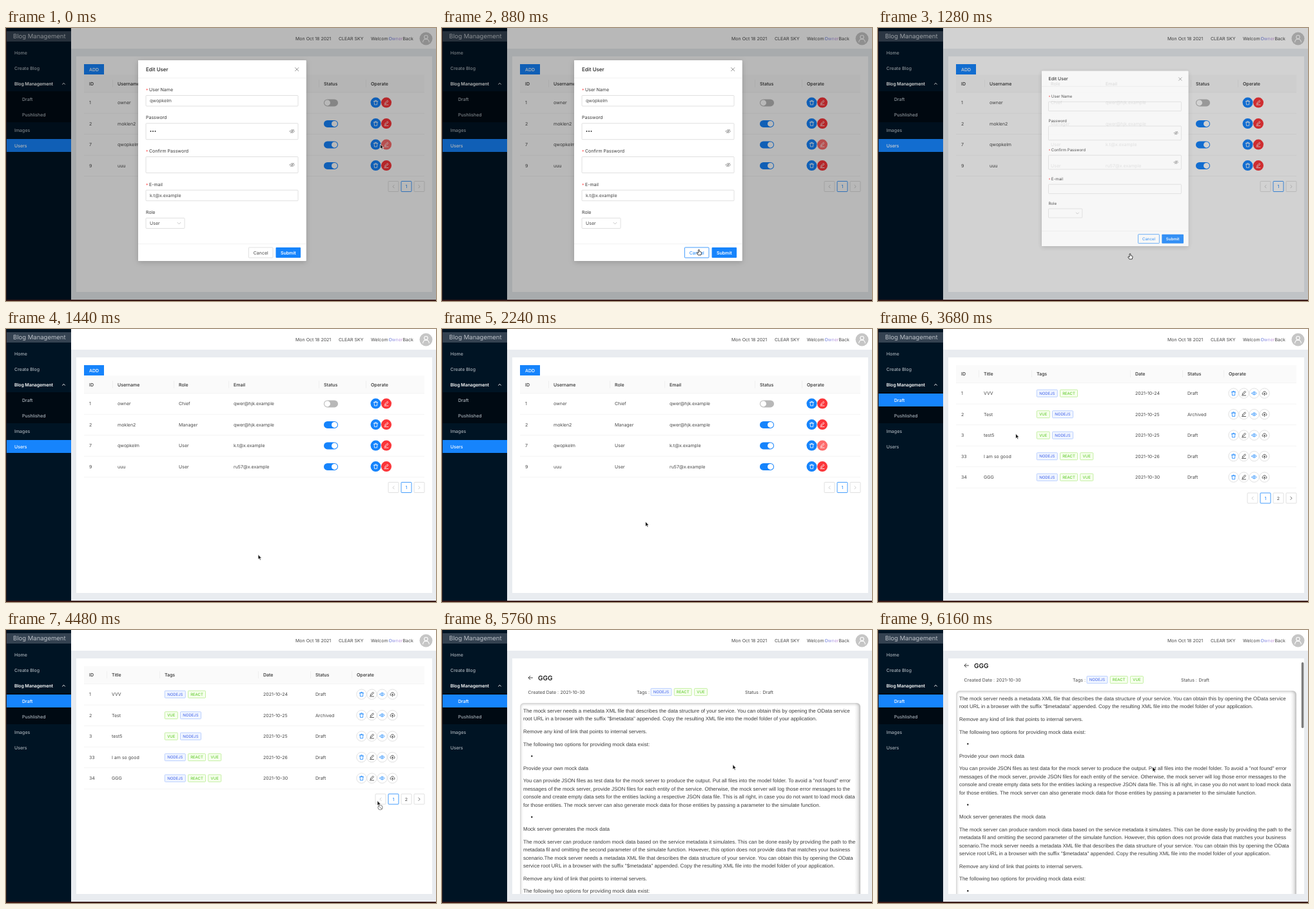
Write an HTML page that moves like this. It is 667 px wide and 423 px high and loops after 6.24 s.

```html
<!DOCTYPE html>
<html lang="en">
<head>
<meta charset="utf-8">
<title>Blog Management</title>
<style>
  html, body { margin: 0; width: 100%; height: 100%; overflow: hidden; background: #fff; }
  svg { display: block; width: 100vw; height: 100vh; }
  text { font-family: Inter, "Open Sans", sans-serif; text-rendering: geometricPrecision; white-space: pre; }
  .article text { font-family: "Liberation Sans", sans-serif; }
</style>
</head>
<body>
<svg id="stage" viewBox="0 0 667 423" xmlns="http://www.w3.org/2000/svg"></svg>
<script>
const LOOP = 6240, STEP = 80;
const BLUE = '#1684fc', RED = '#fb363a', PINK = '#fd6c6c', INK = '#484848', HEAD = '#2c2c2c', EDGE = '#d9d9d9';

// Drawing helpers; text is placed by its vertical centre
const rect = (x, y, w, h, fill, extra = '') => `<rect x="${x}" y="${y}" width="${w}" height="${h}" fill="${fill}" ${extra}/>`;
const text = (x, cy, str, { size = 7, fill = INK, weight = 400, extra = '' } = {}) =>
  `<text x="${x}" y="${cy + size * 0.36}" font-size="${size}" font-weight="${weight}" fill="${fill}" ${extra}>${str}</text>`;
const line = (d, color, width = 0.8, extra = '') =>
  `<path d="${d}" fill="none" stroke="${color}" stroke-width="${width}" stroke-linecap="round" stroke-linejoin="round" ${extra}/>`;
const disc = (x, y, r, fill, extra = '') => `<circle cx="${x}" cy="${y}" r="${r}" fill="${fill}" ${extra}/>`;
const at = (x, y, inner) => `<g transform="translate(${x} ${y})">${inner}</g>`;
const group = (id, inner, extra = '') => `<g id="${id}" ${extra}>${inner}</g>`;
const box = (x, y, w, h, color = EDGE, fill = '#fff', extra = '') => rect(x, y, w, h, fill, `rx="1" stroke="${color}" stroke-width=".8" ${extra}`);
const middle = 'text-anchor="middle"';

const icons = {
  trash: c => line('M-3.2-2H3.2M-1.2-2V-3.3H1.2V-2M-2.4-2L-2 3.3H2L2.4-2', c),
  pen: c => line('M-2.3 1.6L-1.9 0 1.7-3.3 3-2-.6 1.4ZM-3 3.4H3', c),
  eye: c => line('M-3.6 0Q0-5 3.6 0Q0 5-3.6 0Z', c) + disc(0, 0, 1.1, 'none', `stroke="${c}" stroke-width=".8"`),
  cloud: c => line('M-2 2.2A1.8 1.8 0 0 1-2.4-1.2A2.6 2.6 0 0 1 2.4-1.2A1.8 1.8 0 0 1 2 2.2M0 3.4V-.4M-1.2.8L0-.5 1.2.8', c),
};

function sidebar() {
  const item = (x, cy, str, id = '') => text(x, cy, str, { fill: '#a9b1b9', weight: 500, extra: id && `id="${id}"` });
  return rect(0, 0, 101, 423, '#001424') + rect(1, 5, 100, 16, '#344251') +
    text(11, 13, 'Blog Management', { size: 9.5, fill: '#bcc2c9' }) +
    rect(1, 98, 100, 48, '#000a13') + rect(1, 172, 100, 20, BLUE, 'id="highlight"') +
    item(13, 38, 'Home') + item(13, 62, 'Create Blog') +
    text(13, 86, 'Blog Management', { fill: '#fff', weight: 600, extra: 'letter-spacing="-.1"' }) +
    line('M87.6 87.2L89.5 85.3 91.4 87.2', '#fff', 1) +
    item(25, 110, 'Draft', 'draftItem') + item(25, 134, 'Pushlished') +
    item(13, 158, 'Images') + item(13, 182, 'Users', 'usersItem');
}

function header() {
  return rect(101, 0, 566, 32, '#fff') +
    text(449, 16, 'Mon Oct 18 2021') + text(516, 16, 'CLEAR SKY') +
    text(566, 16, 'Welcom') + text(593.5, 16, 'Owner', { fill: 'url(#rainbow)' }) + text(615.5, 16, 'Back') +
    disc(651.5, 16.5, 10, '#c6c6c6') +
    disc(651.5, 14, 2.7, 'none', 'stroke="#fff" stroke-width="1.1"') +
    line('M646.7 21.8Q647 17.2 651.5 17.2T656.3 21.8', '#fff', 1.1);
}

function tableHead(y, columns) {
  return rect(121, y, 528, 27, '#fafafa') +
    columns.map(([x, name], i) => text(x, y + 13.5, name, { fill: HEAD, weight: 500 }) +
      (i ? rect(x - 8, y + 8, 0.6, 11, '#e8e8e8') : '')).join('') +
    rect(121, y + 27, 528, 0.7, '#efefef');
}

const rowLine = cy => rect(121, cy + 16.2, 528, 0.7, '#efefef');

function pager(y, pages) {
  const left = 613 - 20 * pages;
  const arrow = (x, dir, color) => line(`M${x - dir} ${y + 6}L${x + dir} ${y + 8.2} ${x - dir} ${y + 10.4}`, color, 0.8);
  let out = box(left, y, 16, 16) + arrow(left + 8, -1.1, '#c0c0c0');
  for (let p = 1; p <= pages; p++) {
    const x = left + 20 * p;
    out += box(x, y, 16, 16, p === 1 ? BLUE : EDGE) +
      text(x + 8, y + 8.2, p, { fill: p === 1 ? BLUE : INK, extra: middle });
  }
  return out + box(633, y, 16, 16) + arrow(641, 1.1, pages > 1 ? INK : '#c0c0c0');
}

function usersPage() {
  const rows = [
    [1, 'owner', 'Chief', 'qwer@hjk.example', false],
    [2, 'moklen2', 'Manager', 'qwer@hjk.example', true],
    [7, 'qwopkelm', 'User', 'k.t@x.example', true],
    [9, 'uuu', 'User', 'ru57@x.example', true],
  ];
  const row = ([id, name, role, mail, on], i) => {
    const cy = 115.6 + 32.5 * i;
    return text(129, cy, id) + text(173, cy, name) + text(268, cy, role) + text(353, cy, mail) +
      rect(493, cy - 5.2, 22, 11, on ? BLUE : '#b8b8b8', 'rx="5.5"') + disc(on ? 509.5 : 498.5, cy + 0.3, 4.5, '#fff') +
      disc(573.5, cy, 8, BLUE) + at(573.5, cy, icons.trash('#fff')) +
      disc(590, cy, 8, RED, id === 7 ? 'id="editButton"' : '') + at(590, cy, icons.pen('#fff')) + rowLine(cy);
  };
  return rect(121, 56, 31, 16, BLUE) + text(136.5, 64.2, 'ADD', { fill: '#fff', weight: 500, extra: middle }) +
    tableHead(72.5, [[129, 'ID'], [173, 'Username'], [268, 'Role'], [353, 'Email'], [493, 'Status'], [566, 'Operate']]) +
    rows.map(row).join('') + pager(237.5, 1);
}

const tagStyles = {
  NODEJS: [32, '#f0f5ff', '#adc6ff', '#3f62ea'],
  REACT: [27, '#f6ffed', '#b7eb8f', '#52c41a'],
  VUE: [20, '#f6ffed', '#b7eb8f', '#52c41a'],
};
function tags(x, cy, names) {
  return names.map(name => {
    const [w, fill, edge, ink] = tagStyles[name];
    const out = box(x, cy - 5.4, w, 11, edge, fill) + text(x + w / 2, cy + 0.2, name, { size: 6, fill: ink, extra: middle });
    x += w + 4.2;
    return out;
  }).join('');
}

function draftsPage() {
  const rows = [
    [1, 'VVV', ['NODEJS', 'REACT'], '24', 'Draft'],
    [2, 'Test', ['VUE', 'NODEJS'], '25', 'Archived'],
    [3, 'test5', ['VUE', 'NODEJS'], '25', 'Draft'],
    [33, 'I am so good', ['NODEJS', 'REACT', 'VUE'], '26', 'Draft'],
    [34, 'GGG', ['NODEJS', 'REACT', 'VUE'], '30', 'Draft'],
  ];
  const row = ([id, title, names, day, status], i) => {
    const cy = 99.6 + 32.5 * i;
    const tools = [['trash', BLUE], ['pen', '#333'], ['eye', BLUE], ['cloud', '#333']].map(([icon, color], k) =>
      at(551.5 + 16 * k, cy, disc(0, 0, 7.7, '#fff', `stroke="${EDGE}" stroke-width=".8"`) + icons[icon](color))).join('');
    return text(129, cy, id) + text(164, cy, title) + tags(246.3, cy, names) +
      text(399, cy, '2021-10-' + day) + text(480, cy, status) + tools + rowLine(cy);
  };
  return tableHead(56, [[129, 'ID'], [164, 'Title'], [246, 'Tags'], [399, 'Date'], [480, 'Status'], [544, 'Operate']]) +
    rows.map(row).join('') + pager(254, 2);
}

function article() {
  const intro = [
    'The mock server needs a metadata XML file that describes the data structure of your service. You can obtain this by opening the OData service',
    'root URL in a browser with the suffix "$metadata" appended. Copy the resulting XML file into the model folder of your application.',
  ];
  const remove = ['Remove any kind of link that points to internal servers.'];
  const options = ['The following two options for providing mock data exist:'];
  const bullet = null;
  const blocks = [intro, remove, options, bullet, ['Provide your own mock data'], [
    'You can provide JSON files as test data for the mock server to produce the output. Put all files into the model folder. To avoid a "not found" error',
    'messages of the mock server, provide JSON files for each entity of the service. Otherwise, the mock server will log those error messages to the',
    'console and create empty data sets for the entities lacking a respective JSON data file. This is all right, in case you do not want to load mock data',
    'for those entities. The mock server can also generate mock data for those entities by passing a parameter to the simulate function.',
  ], bullet, ['Mock server generates the mock data'], [
    'The mock server can produce random mock data based on the service metadata it simulates. This can be done easily by providing the path to the',
    'metadata fil and omitting the second parameter of the simulate function. However, this option does not provide data that matches your business',
    'scenario.The mock server needs a metadata XML file that describes the data structure of your service. You can obtain this by opening the OData',
    'service root URL in a browser with the suffix "$metadata" appended. Copy the resulting XML file into the model folder of your application.',
  ], remove, options, bullet];
  let y = 125, out = '';
  for (const block of blocks) {
    if (!block) {
      out += disc(139.3, y - 0.9, 1.2, '#222');
      y += 17.5;
      continue;
    }
    for (const str of block) {
      out += text(126, y, str, { size: 8, fill: '#3c3c3c' });
      y += 12.57;
    }
    y += 7;
  }
  return `<g class="article">${out}</g>`;
}

function detailPage() {
  return line('M140.5 74H134M136.8 71.2L134 74 136.8 76.8', '#333', 0.9) +
    text(149, 74.2, 'GGG', { size: 10, fill: '#1e1e1e', weight: 600 }) +
    text(133.5, 96.2, 'Created Date :') + text(183.5, 96.2, '2021-10-30') +
    text(302, 96.2, 'Tags :') + tags(324, 96, ['NODEJS', 'REACT', 'VUE']) +
    text(470, 96.2, 'Status :') + text(497.5, 96.2, 'Draft') +
    `<g clip-path="url(#paper)">
      <rect x="120" y="112.5" width="530" height="420" rx="6" fill="none" stroke="#a8a8a8" stroke-width="3" filter="url(#soft)"/>
      ${rect(640, 113, 9, 420, 'url(#sideShade)')}</g>` + article();
}

function modal() {
  const label = (cy, str, required) => (required ? text(217, cy + 1, '*', { fill: '#ff4d4f' }) : '') + text(required ? 222 : 217, cy, str, { fill: '#383838' });
  const input = (y, h) => box(217, y, 236, h);
  const hiddenEye = cy => at(444, cy, icons.eye('#8a8a8a') + line('M-2.6 2.8L2.6-2.8', '#8a8a8a', 0.7));
  return rect(205, 50, 260.5, 311, '#fff', 'rx="1" filter="url(#shadow)"') + rect(205, 50, 260.5, 311, '#fff', 'rx="1"') +
    text(217, 64, 'Edit User', { size: 8, fill: '#222', weight: 500 }) +
    line('M448.6 61.5L453.8 66.7M453.8 61.5L448.6 66.7', '#777', 0.8) +
    rect(205, 77, 260.5, 0.7, '#ececec') +
    label(95, 'User Name', true) + input(104.5, 16.5) +
    label(138.3, 'Password') + input(147.7, 25) + hiddenEye(160) +
    label(190, 'Confirm Password', true) + input(199.5, 25) + hiddenEye(212) +
    label(242, 'E-mail', true) + input(251.2, 16.5) +
    label(285, 'Role') + box(217, 294.5, 60, 16) + line('M266 301.4L268.4 303.8 270.8 301.4', '#b5b5b5', 0.8) +
    group('values', text(223, 112.8, 'qwopkelm') + [224.5, 228, 231.5].map(x => disc(x, 160, 1, '#333')).join('') +
      text(223, 259.6, 'k.t@x.example') + text(223, 302.6, 'User')) +
    rect(205, 334, 260.5, 0.7, '#ececec') +
    box(376.4, 340, 37.6, 16, EDGE, '#fff', 'id="cancelBox"') + text(395.2, 348.2, 'Cancel', { extra: `id="cancelText" ${middle}` }) +
    rect(418.5, 340, 38.6, 16, BLUE, 'rx="1"') + text(437.8, 348.2, 'Submit', { fill: '#fff', weight: 600, extra: middle });
}

function pointers() {
  const arrow = '<path d="M0 0V7.6L1.8 6 3 8.7 4.3 8.1 3.1 5.5H5.4Z" fill="#111" stroke="#fff" stroke-width=".7"/>';
  const hand = '<path d="M-.9.6Q0-.6.9.6V3.2L3.4 3.8Q4.2 4.2 4 5.4L3.2 8.6H-1.2L-3.2 5.6Q-3 4.4-1.8 5L-.9 5.6Z" fill="#fff" stroke="#111" stroke-width=".8"/>';
  const ban = disc(4.5, 10.5, 3.6, '#fff', 'stroke="#777" stroke-width="1"') + line('M2.2 8.2L6.8 12.8', '#777', 1);
  return group('arrow', arrow) + group('hand', hand) + group('ban', ban);
}

const stage = document.getElementById('stage');
stage.innerHTML = `<defs>
  <linearGradient id="rainbow"><stop offset="0" stop-color="#5b74d8"/><stop offset=".55" stop-color="#a79be6"/><stop offset="1" stop-color="#d69ad8"/></linearGradient>
  <linearGradient id="sideShade"><stop offset="0" stop-color="#888" stop-opacity="0"/><stop offset="1" stop-color="#888" stop-opacity=".3"/></linearGradient>
  <filter id="soft" x="-5%" y="-5%" width="110%" height="110%"><feGaussianBlur stdDeviation="2"/></filter>
  <filter id="shadow" x="-10%" y="-10%" width="120%" height="120%"><feDropShadow dx="0" dy="2" stdDeviation="4" flood-opacity=".18"/></filter>
  <clipPath id="paper"><rect x="121" y="113" width="528" height="420" rx="6"/></clipPath>
  <clipPath id="card"><rect x="109" y="44" width="552" height="365"/></clipPath>
  </defs>` +
  rect(0, 0, 667, 423, '#e9ecf0') + sidebar() + header() + rect(109, 44, 552, 365, '#fff') +
  `<g clip-path="url(#card)">` + group('users', usersPage()) + group('drafts', draftsPage()) + group('detail', detailPage()) + '</g>' +
  rect(656.8, 50, 3.6, 102, '#7c7c7c', 'rx="1.8" id="scrollbar"') +
  rect(0, 0, 667, 421, '#000', 'id="mask"') + group('modal', modal()) +
  rect(0, 421, 667, 2, '#3a1916') + rect(0, 0, 1, 423, '#2a1a1c') + group('cursor', pointers());

const ui = Object.fromEntries([...stage.querySelectorAll('[id]')].map(el => [el.id, el]));
const show = (el, on) => el.setAttribute('display', on ? 'inline' : 'none');
const clamp = v => Math.min(1, Math.max(0, v));
const ease = v => v * v * (3 - 2 * v);
const during = (t, a, b) => t >= a && t < b;

// Time, x and y of the pointer tip
const route = [
  [0, 580.5, 180], [240, 580.5, 180], [960, 392, 349], [1280, 391, 349.5], [2000, 391.5, 349.5],
  [2800, 40, 113], [3040, 37, 111.5], [3280, 37, 111.5], [4320, 572, 265], [4480, 576, 264.5],
  [4720, 583, 229], [5040, 583, 229], [5600, 451, 208.5], [5760, 451, 208.5], [6000, 426, 212], [6240, 426, 212],
];
function pointerAt(t) {
  const i = route.findIndex(([end]) => end > t);
  const [t0, x0, y0] = route[i - 1], [t1, x1, y1] = route[i];
  const k = ease((t - t0) / (t1 - t0));
  return [x0 + (x1 - x0) * k, y0 + (y1 - y0) * k];
}

function draw(t) {
  const onUsers = t < 3200, onDetail = t >= 5040;
  show(ui.users, onUsers);
  show(ui.drafts, !onUsers && !onDetail);
  show(ui.detail, onDetail);
  ui.highlight.setAttribute('y', onUsers ? 172 : 100);
  ui.usersItem.setAttribute('fill', onUsers ? '#fff' : '#a9b1b9');
  ui.draftItem.setAttribute('fill', t >= 2720 ? '#fff' : '#a9b1b9');
  ui.editButton.setAttribute('fill', during(t, 1200, 1520) ? RED : PINK);

  // Dialog shrinks towards the button that opened it
  const closing = clamp((t - 1207) / 200);
  const rise = closing ** 3, gone = rise / (rise + (1 - closing) ** 3);
  show(ui.modal, closing < 1);
  ui.modal.setAttribute('opacity', 1 - gone);
  ui.modal.setAttribute('transform', `translate(589 181) scale(${1 - 0.8 * gone}) translate(-589 -181)`);
  ui.mask.setAttribute('opacity', 0.28 * (1 - closing));
  show(ui.values, t < 1200);
  const hot = t >= 880;
  ui.cancelBox.setAttribute('stroke', hot ? BLUE : EDGE);
  ui.cancelText.setAttribute('fill', hot ? BLUE : INK);

  const scroll = 19 * ease(clamp((t - 5800) / 320));
  ui.detail.setAttribute('transform', `translate(0 ${-scroll})`);
  show(ui.scrollbar, t >= 5840);

  const [x, y] = pointerAt(t);
  const pointing = during(t, 880, 1360) || during(t, 2640, 3360) || during(t, 4640, 5040);
  ui.cursor.setAttribute('transform', `translate(${x} ${y})`);
  show(ui.hand, pointing);
  show(ui.arrow, !pointing);
  show(ui.ban, during(t, 4400, 4560));
}

function tick() {
  const t = performance.now() % LOOP;
  draw(Math.floor(t / STEP) * STEP);
  requestAnimationFrame(tick);
}
tick();
</script>
</body>
</html>
```
